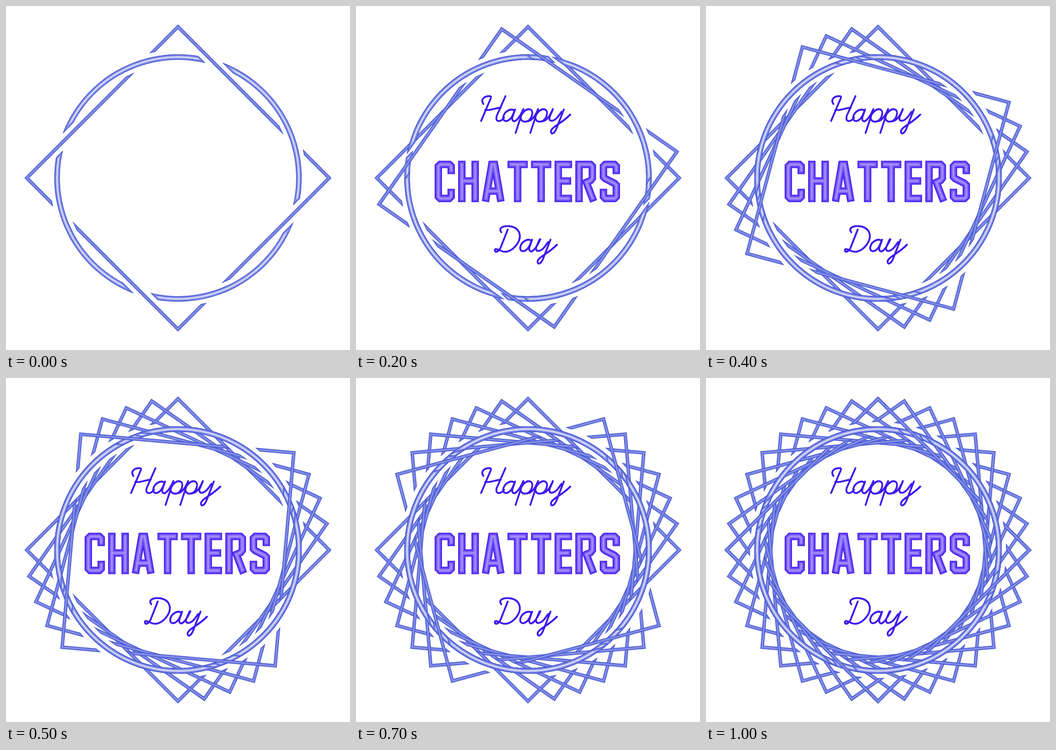
Animation of 748x748 px, one loop 1.2 s. Source, as an HTML page with a canvas:

```html
<!DOCTYPE html>
<html lang="en">
<head>
<meta charset="utf-8">
<title>Greeting</title>
<style>
html, body { margin: 0; width: 100%; height: 100%; overflow: hidden; background: #fff; }
canvas { display: block; width: 748px; height: 748px; }
</style>
</head>
<body>
<canvas id="stage" width="748" height="748" role="img" aria-label="Happy CHATTERS Day"></canvas>
<script>
const SIZE = 748, MID = SIZE / 2, LOOP = 1200, STEP = 100, TURN = Math.PI / 18;
const stage = document.getElementById('stage').getContext('2d');

// Diamond corner radii, ring radii, and the clearances around each crossing.
const CORNER_OUT = 334, CORNER_IN = 323.5;
const RING_OUT = 269, RING_IN = 257;
const CUT_IN = 248, CUT_OUT = 278.5;
const GAP_NEAR = 310, GAP_FAR = 347;

const FRAME_SHADES = [[0, 58, 77, 204], [1.5, 102, 116, 223], [3.6, 150, 158, 236], [6, 250, 250, 255]];
const WORD_SHADES = [[0, 68, 26, 238], [2, 86, 50, 242], [5, 132, 106, 252], [8, 178, 158, 255]];

function newLayer() {
  const c = document.createElement('canvas');
  c.width = c.height = SIZE;
  return c.getContext('2d');
}

function shade(stops, d) {
  let i = 1;
  while (i < stops.length - 1 && d > stops[i][0]) i++;
  const a = stops[i - 1], b = stops[i];
  const k = Math.max(0, Math.min(1, (d - a[0]) / (b[0] - a[0])));
  const mix = n => Math.round(a[n] + (b[n] - a[n]) * k);
  return `rgb(${mix(1)},${mix(2)},${mix(3)})`;
}

// Where the upper right line x - y = d meets a circle; side picks the crossing.
function meet(d, r, side) {
  const s = Math.sqrt(2 * r * r - d * d) * side;
  return [(d + s) / 2, (s - d) / 2];
}

const flip = ([x, y]) => [-x, y];
const angle = ([x, y]) => Math.atan2(y, x);

function cornerPiece() {
  const p = new Path2D();
  [
    flip(meet(CORNER_OUT, CUT_OUT, -1)), [0, -CORNER_OUT], meet(CORNER_OUT, CUT_IN, 1),
    meet(CORNER_IN, CUT_IN, 1), [0, -CORNER_IN], flip(meet(CORNER_IN, CUT_OUT, -1))
  ].forEach(q => p.lineTo(...q));
  p.closePath();
  return p;
}

function arcPiece() {
  const p = new Path2D(), quarter = Math.PI / 2;
  const from = r => angle(meet(GAP_FAR, r, -1));
  const to = r => angle(meet(GAP_NEAR, r, -1)) + quarter;
  p.arc(0, 0, RING_OUT, from(RING_OUT), to(RING_OUT));
  p.arc(0, 0, RING_IN, to(RING_IN), from(RING_IN), true);
  p.closePath();
  return p;
}

function frameShape() {
  const all = new Path2D();
  for (let i = 0; i < 4; i++) {
    const m = new DOMMatrix().rotate(i * 90);
    all.addPath(cornerPiece(), m);
    all.addPath(arcPiece(), m);
  }
  return all;
}

function frameLayer(shape, turn) {
  const g = newLayer();
  g.translate(MID, MID);
  g.rotate(turn);
  g.fillStyle = shade(FRAME_SHADES, 6);
  g.fill(shape);
  g.globalCompositeOperation = 'source-atop';
  for (let d = 6; d > 0; d -= 0.5) {
    g.lineWidth = 2 * d;
    g.strokeStyle = shade(FRAME_SHADES, d - 0.5);
    g.stroke(shape);
  }
  return g.canvas;
}

// Block letters as centre lines: advance width, then the pen path.
const BLOCK = {
  C: [44, 'M36 21V12L32 8H12L8 12V78L12 82H32L36 78V69'],
  H: [45, 'M8 8V82M37 8V82M8 44H37'],
  A: [48, 'M8.5 81L21 8H27L39.5 81M15 66H33'],
  T: [44, 'M8 8H36M22 8V82'],
  E: [38, 'M8 8V82M8 8H30M8 44H28M8 82H30'],
  R: [46, 'M8 8V82M8 8H33L37 12V38L33 43L24 47L37 81'],
  S: [44, 'M36 21V12L32 8H12L8 12V35L12 39L32 49L36 53V78L32 82H12L8 78V69']
};

function blockWord(g, word, x, y, gap) {
  const path = new Path2D();
  for (const ch of word) {
    const [w, pen] = BLOCK[ch];
    path.addPath(new Path2D(pen), new DOMMatrix().translate(x, y));
    x += w + gap;
  }
  g.lineCap = 'square';
  g.lineJoin = 'miter';
  for (let d = 0; d < 8; d += 0.5) {
    g.lineWidth = 16 - 2 * d;
    g.strokeStyle = shade(WORD_SHADES, d);
    g.stroke(path);
  }
}

const SCRIPT = {
  H: 'M277 213C270 203 279 196 290 196C295 196 294 199 292 203L272 250M325 196L306 239C302 252 313 254 322 243M281 226C292 228 302 222 315 221',
  a: 'M345 228C336 220 321 231 320 243C320 254 333 252 340 239L346 225L341 239C337 250 343 254 350 247C356 241 360 233 364 224',
  p: 'M364 224L347 276M357 243C361 231 371 222 379 225C388 229 382 248 371 251C364 253 358 249 358 243M371 251C382 251 390 239 396 224',
  y: 'M428 225L421 241C418 253 430 252 439 241M452 225L436 266C431 279 423 280 424 272C425 263 448 255 466 236M439 241L447 230',
  D: 'M316 492C308 482 322 477 335 479C356 482 361 500 352 515C343 530 328 538 317 533C308 529 301 526 302 532C304 538 312 532 315 524L330 486'
};

function scriptWord(g, marks) {
  const path = new Path2D();
  for (const [ch, x, y] of marks)
    path.addPath(new Path2D(SCRIPT[ch]), new DOMMatrix().translate(x, y));
  g.lineCap = g.lineJoin = 'round';
  g.lineWidth = 4;
  g.strokeStyle = '#4018f0';
  g.stroke(path);
}

function wordLayer() {
  const g = newLayer();
  scriptWord(g, [['H', 0, 0], ['a', 0, 0], ['p', 0, 0], ['p', 32, 0], ['y', 0, 0]]);
  blockWord(g, 'CHATTERS', 171, 336.5, 7.15);
  scriptWord(g, [['D', 0, 0], ['a', 37, 283], ['y', -29, 283]]);
  return g.canvas;
}

const shape = frameShape();
const layers = Array.from({ length: 10 }, (_, i) => frameLayer(shape, -i * TURN));
const words = wordLayer();
let start = null;

function draw(now) {
  if (start === null) start = now;
  const step = Math.floor(((now - start) % LOOP) / STEP);
  const count = Math.max(1, Math.min(layers.length, step));
  stage.fillStyle = '#fff';
  stage.fillRect(0, 0, SIZE, SIZE);
  for (let i = 0; i < count; i++) stage.drawImage(layers[i], 0, 0);
  if (step > 0) stage.drawImage(words, 0, 0);
  requestAnimationFrame(draw);
}
requestAnimationFrame(draw);
</script>
</body>
</html>
```
